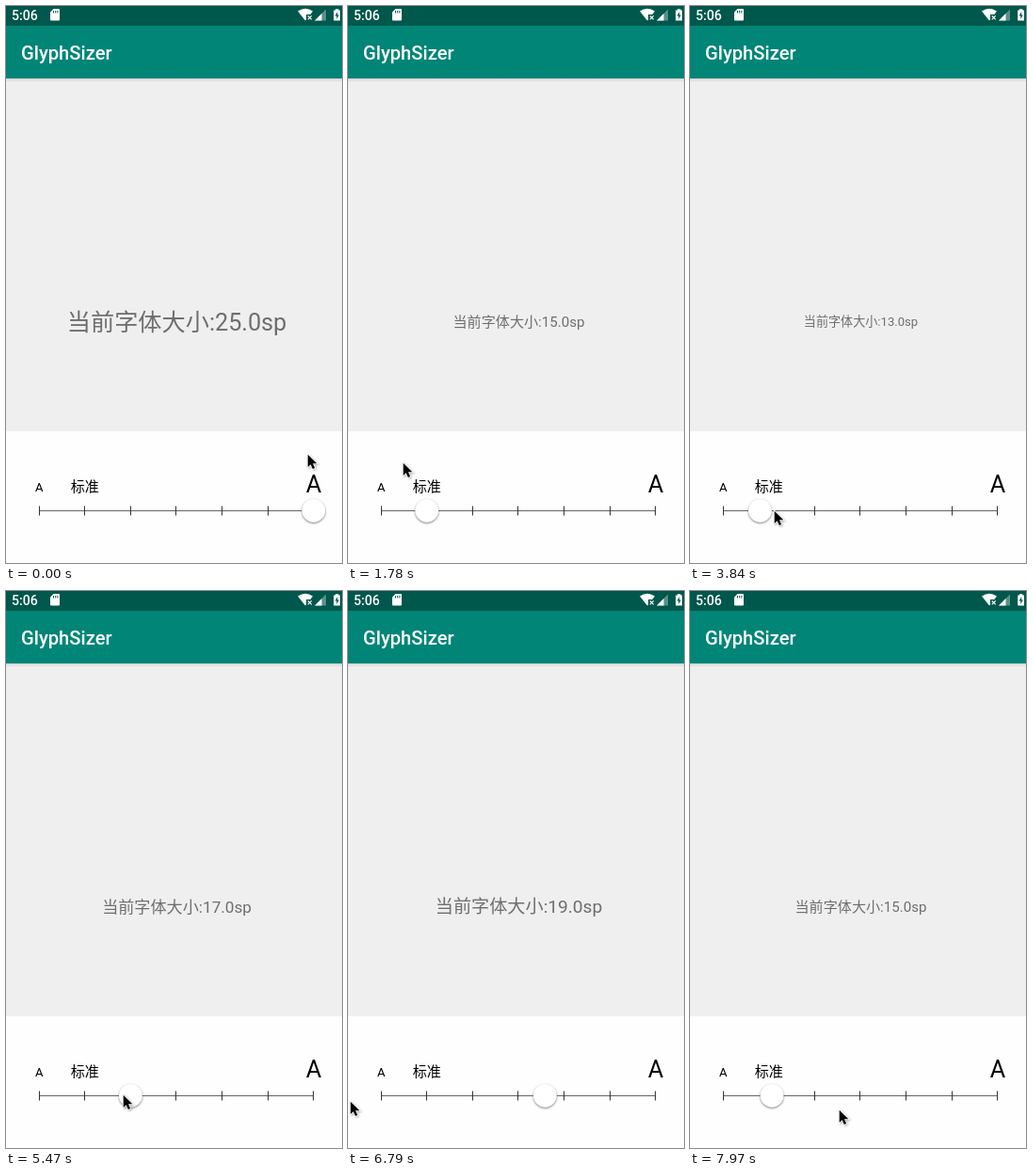
Write an HTML page that moves like this. It is 357 px wide and 592 px high and loops after 8 s.

```html
<!DOCTYPE html>
<html lang="zh-CN">
<head>
<meta charset="utf-8">
<title>GlyphSizer</title>
<style>
html, body { margin: 0; width: 100%; height: 100%; overflow: hidden; background: #fff; }
svg { display: block; width: 357px; height: 592px; }
text { font-family: Roboto, "Noto Sans CJK SC", "Noto Sans CJK", sans-serif; }
.mid { text-anchor: middle; }
.medium { font-weight: 500; fill: #fff; }
#thumb { filter: drop-shadow(.7px 1px 1.3px rgba(0, 0, 0, .5)); }
#cursor { filter: drop-shadow(1px 1px 1px rgba(0, 0, 0, .3)); }
</style>
</head>
<body>
<svg viewBox="0 0 357 592">
  <defs>
    <linearGradient id="shade" x2="0" y2="1">
      <stop stop-color="#d4d4d4"/><stop offset="1" stop-color="#efefef"/>
    </linearGradient>
  </defs>
  <rect width="357" height="452" fill="#efefef"/>
  <rect y="452" width="357" height="140" fill="#fefefe"/>
  <rect y="77" width="357" height="4" fill="url(#shade)"/>
  <rect width="357" height="77" fill="#008577"/>
  <rect width="357" height="21" fill="#00574b"/>

  <text class="medium" x="6" y="14.5" font-size="14.1">5:06</text>
  <path fill="#fff" d="M50.5 3H56q1 0 1 1V14.5q0 1-1 1H48q-1 0-1-1V6.5Z"/>
  <path stroke="#00574b" d="M50.5 5v2.5M52.7 5v2.5M54.9 5v2.5"/>
  <path fill="#fff" d="M310 5.5Q318 0 326 5.5L323.3 9H319V14.4L318 15.5Z"/>
  <path stroke="#fff" stroke-width="1.2" d="M320.7 10.3l4 4M324.7 10.3l-4 4"/>
  <path fill="#fff" opacity=".35" d="M328 15.5H340V3.5Z"/>
  <path fill="#fff" d="M328 15.5H335.5V8Z"/>
  <path fill="#fff" d="M350 3.2h3.4v1.3h1.6v11h-6.8v-11H350Z"/>
  <path fill="#00574b" d="M352.2 6L349.6 10.6H351.3V14L353.8 9.4H352.2Z"/>

  <text class="medium" x="16" y="57" font-size="20.2">GlyphSizer</text>
  <text id="label" class="mid" x="181.5" fill="#6e6e6e"></text>

  <text class="mid" x="35.3" y="516" font-size="13.1">A</text>
  <text class="mid" x="83.8" y="516" font-size="15.1">标准</text>
  <text class="mid" x="327" y="517" font-size="25.2">A</text>
  <path stroke="#666" d="M35 536.5H327"/>
  <path id="ticks" stroke="#333"/>
  <circle id="thumb" cy="536.3" r="12.4" fill="#fff"/>
  <path id="cursor" stroke="#fff" stroke-width="1.6" paint-order="stroke"
    d="M.7 .7V14L3.7 11.2 5.8 16 8.1 15 6 10.3H10.3Z"/>
</svg>
<script>
const LOOP = 8000, STEP = 147.6, LEAD = 8;  // the screen refreshes once per step
const LEFT = 35.2, GAP = 48.6, LAST = 6;
const DENSITY = 363 / 360;
const LAG = 1.15;  // steps the thumb trails a dragging pointer

// Turning points of the pointer: [step, x, y]
const path = [
  [0, 320, 476], [9, 98, 483], [10, 98, 483], [12, 58, 485], [17, 34, 511],
  [22, 55, 534], [30, 122, 537], [37, 124, 535], [42, 341, 539], [44, 341, 540],
  [46, 2, 542], [49, 346, 550], [52, 42, 557], [54, 158, 551]
];
const taps = [3, 4, 5, 11, 16, 35];
const drags = [[23, 35], [39, 55]];

const el = id => document.getElementById(id);
const tick = i => LEFT + GAP * i;
const clamp = (v, lo, hi) => Math.min(hi, Math.max(lo, v));
const ease = k => k * k * (3 - 2 * k);

function pointer(step) {
  const next = path.findIndex(p => p[0] > step);
  if (next < 0) return path.at(-1).slice(1);
  const [s0, x0, y0] = path[next - 1], [s1, x1, y1] = path[next];
  const k = ease((step - s0) / (s1 - s0));
  return [x0 + (x1 - x0) * k, y0 + (y1 - y0) * k];
}

// A drag follows the pointer late; otherwise the thumb rests on the tick last tapped.
function thumbX(step) {
  if (drags.some(([from, to]) => step >= from && step < to))
    return clamp(pointer(step - LAG)[0], tick(0), tick(LAST));
  const tap = taps.findLast(s => s <= step);
  if (tap === undefined) return tick(LAST);
  return tick(clamp(Math.round((pointer(tap)[0] - LEFT) / GAP), 0, LAST));
}

function draw(time) {
  const step = Math.floor((time % LOOP + LEAD) / STEP);
  const [px, py] = pointer(step).map(Math.round);
  const x = thumbX(step);
  const size = 13 + 2 * Math.floor((x - LEFT) / GAP + 0.01);
  el("cursor").setAttribute("transform", `translate(${px} ${py})`);
  el("thumb").setAttribute("cx", x);
  el("label").setAttribute("font-size", size * DENSITY);
  el("label").setAttribute("y", Math.round(335 + size * 0.39));
  el("label").textContent = `当前字体大小:${size.toFixed(1)}sp`;
}

let marks = "";
for (let i = 0; i <= LAST; i++) marks += `M${Math.floor(tick(i) - 0.1) + 0.5} 531.5v10`;
el("ticks").setAttribute("d", marks);

let start;
function frame(now) {
  start ??= now;
  draw(now - start);
  requestAnimationFrame(frame);
}
draw(0);
requestAnimationFrame(frame);
</script>
</body>
</html>
```
